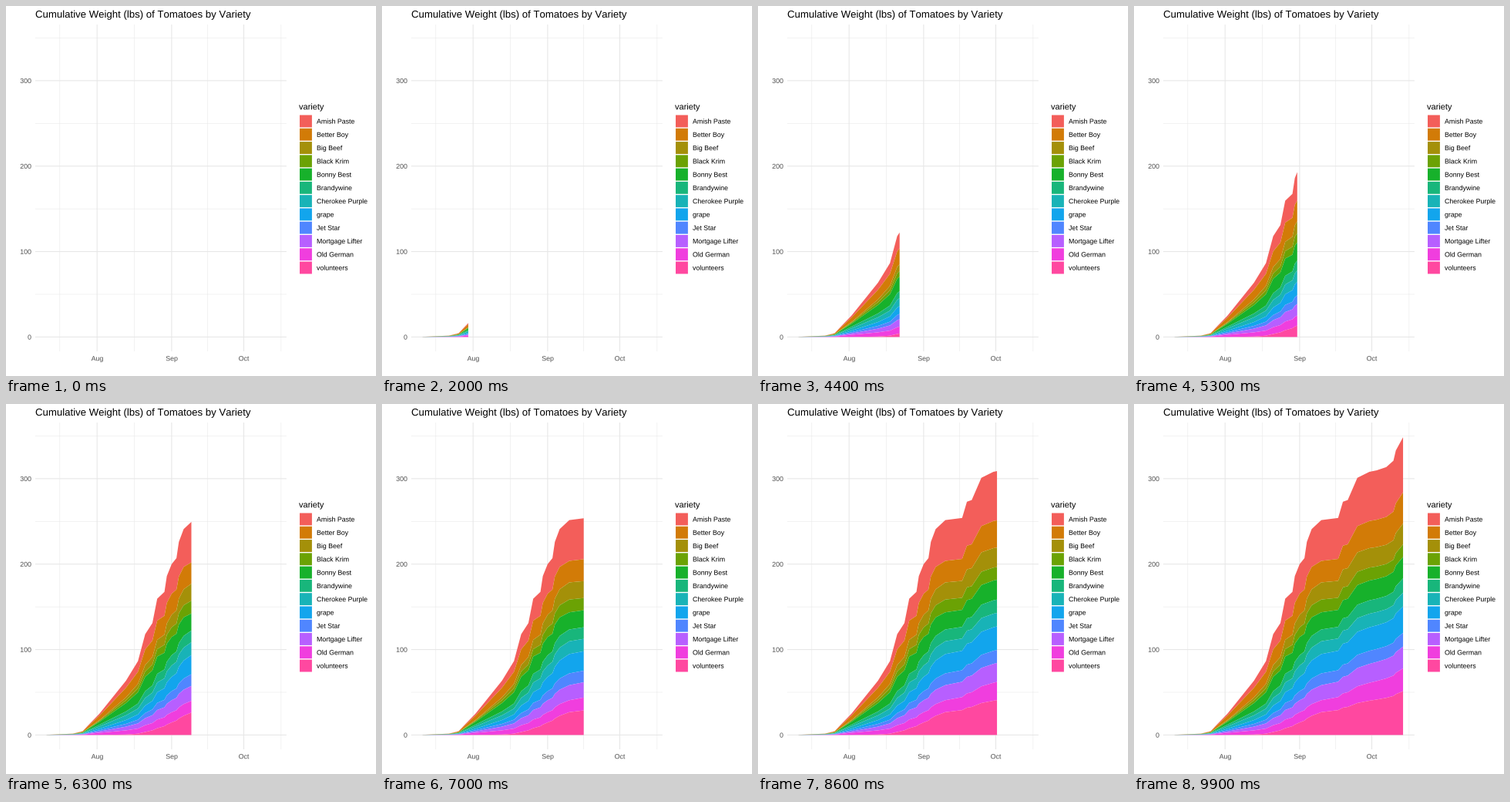
Recreate the animation shown at these times as a matplotlib script. Size 480 by 480 pixels, loop 10000 ms.

```python
import numpy as np
import matplotlib.pyplot as plt
from matplotlib.animation import FuncAnimation
from matplotlib.patches import PathPatch, Polygon, Rectangle
from matplotlib.textpath import TextPath
from matplotlib.transforms import Affine2D

SIZE, DPI = 480, 72
FRAMES, INTERVAL = 100, 100
LEFT, RIGHT, TOP, BOTTOM = 37.9, 363.9, 24, 448
GREY = "#4D4D4D"

plt.rcParams.update({
    "font.family": "Liberation Sans",
    "text.kerning_factor": 6,
    "toolbar": "None",
})

# Name, colour, percent of the harvest at each of SHARE_DAYS
SHARE_DAYS = (18, 36, 60, 95)
VARIETIES = [
    ("Amish Paste", "#F35E5A", (8, 14, 19, 18.5)),
    ("Better Boy", "#D27B07", (22, 17, 10, 10.5)),
    ("Big Beef", "#A49009", (2, 6, 8, 7)),
    ("Black Krim", "#6BA204", (5, 5, 6, 4.2)),
    ("Bonny Best", "#17B12B", (13, 16, 8, 7.2)),
    ("Brandywine", "#18B67B", (8, 7, 5.5, 4.8)),
    ("Cherokee Purple", "#18B3B7", (12, 8, 6, 4.6)),
    ("grape", "#12A5ED", (7, 7, 9, 8.9)),
    ("Jet Star", "#5086FF", (6, 5, 5.5, 4.6)),
    ("Mortgage Lifter", "#B75FFF", (6, 7, 7, 7.3)),
    ("Old German", "#F03EDE", (11, 7, 5.5, 7.7)),
    ("volunteers", "#FF48A0", (0, 1, 10.5, 14.7)),
]

# Turning points of the running total: day (0 = July 11), pounds
DAYS, TOTAL = np.array([
    (0, 0.2), (11, 1.6), (15, 4.5), (17, 10.5), (22, 25), (33, 63.5),
    (38, 86.5), (41, 118), (44, 131), (46, 159.5), (49, 167.5), (50, 186),
    (52, 200), (54, 207), (55, 226), (57, 241), (61, 251.5), (68, 254),
    (70, 273), (72, 275), (76, 301), (81, 308), (84, 309.7), (88, 313.5),
    (91, 321), (92, 333), (95, 348.5)]).T


def px(day):
    return 52.65 + 3.12 * np.asarray(day)


def py(lbs):
    return 429.4 - 1.1085 * np.asarray(lbs)


# Each turning point falls on a whole frame
KEY_FRAMES = np.round(DAYS / DAYS[-1] * (FRAMES - 1))

fig = plt.figure(figsize=(SIZE / DPI, SIZE / DPI), dpi=DPI, facecolor="white")
ax = fig.add_axes([0, 0, 1, 1])
ax.set_xlim(0, SIZE)
ax.set_ylim(SIZE, 0)
ax.axis("off")


def grid(xs, ys, width):
    style = dict(lw=width, color="#E7E7E7", snap=False, zorder=1,
                 solid_capstyle="butt")
    for x in xs:
        ax.plot([x, x], [TOP, BOTTOM], **style)
    for y in ys:
        ax.plot([LEFT, RIGHT], [y, y], **style)


def label(x, y, text, size, color="black", align=0):
    """Outline text on baseline y; align 0 is left, 0.5 centre, 1 right."""
    path = TextPath((0, 0), text, size=size)
    x -= align * path.get_extents().x1
    path = path.transformed(Affine2D().scale(1, -1).translate(x, y))
    ax.add_patch(PathPatch(path, fc=color, lw=0, snap=False))


months = {"Aug": 21, "Sep": 52, "Oct": 82}
grid(px([5.5, 36.5, 67, 97.5]), py([50, 150, 250, 350]), 0.53)
grid(px(list(months.values())), py([0, 100, 200, 300]), 1.07)

label(38, 15.1, "Cumulative Weight (lbs) of Tomatoes by Variety", 13.2)
for lbs in (0, 100, 200, 300):
    label(32.6, py(lbs) + 3.2, str(lbs), 8.8, GREY, 1)
for name, day in months.items():
    label(px(day), 460.2, name, 8.8, GREY, 0.5)

label(380, 134.3, "variety", 11)
for i, (name, color, _) in enumerate(VARIETIES):
    y = 149.4 + 17.28 * i
    ax.add_patch(Rectangle((381, y - 7.9), 15.9, 15.9, fc=color, lw=0,
                           snap=False))
    label(403, y + 3.15, name, 8.8)

bands = [ax.add_patch(Polygon(np.zeros((3, 2)), fc=color, lw=0, zorder=3))
         for _, color, _ in VARIETIES]


def update(frame):
    today = np.interp(frame, KEY_FRAMES, DAYS)
    days = np.append(DAYS[DAYS < today], today)
    total = np.interp(days, DAYS, TOTAL)
    x = px(days)
    low = np.zeros(len(days))
    for band, (_, _, shares) in zip(bands[::-1], VARIETIES[::-1]):
        high = low + total * np.interp(days, SHARE_DAYS, shares) / 100
        band.set_xy(np.column_stack([np.r_[x, x[::-1]],
                                     py(np.r_[low, high[::-1]])]))
        low = high
    return bands


anim = FuncAnimation(fig, update, frames=FRAMES, interval=INTERVAL,
                     repeat=True, repeat_delay=0)
plt.show()
```
